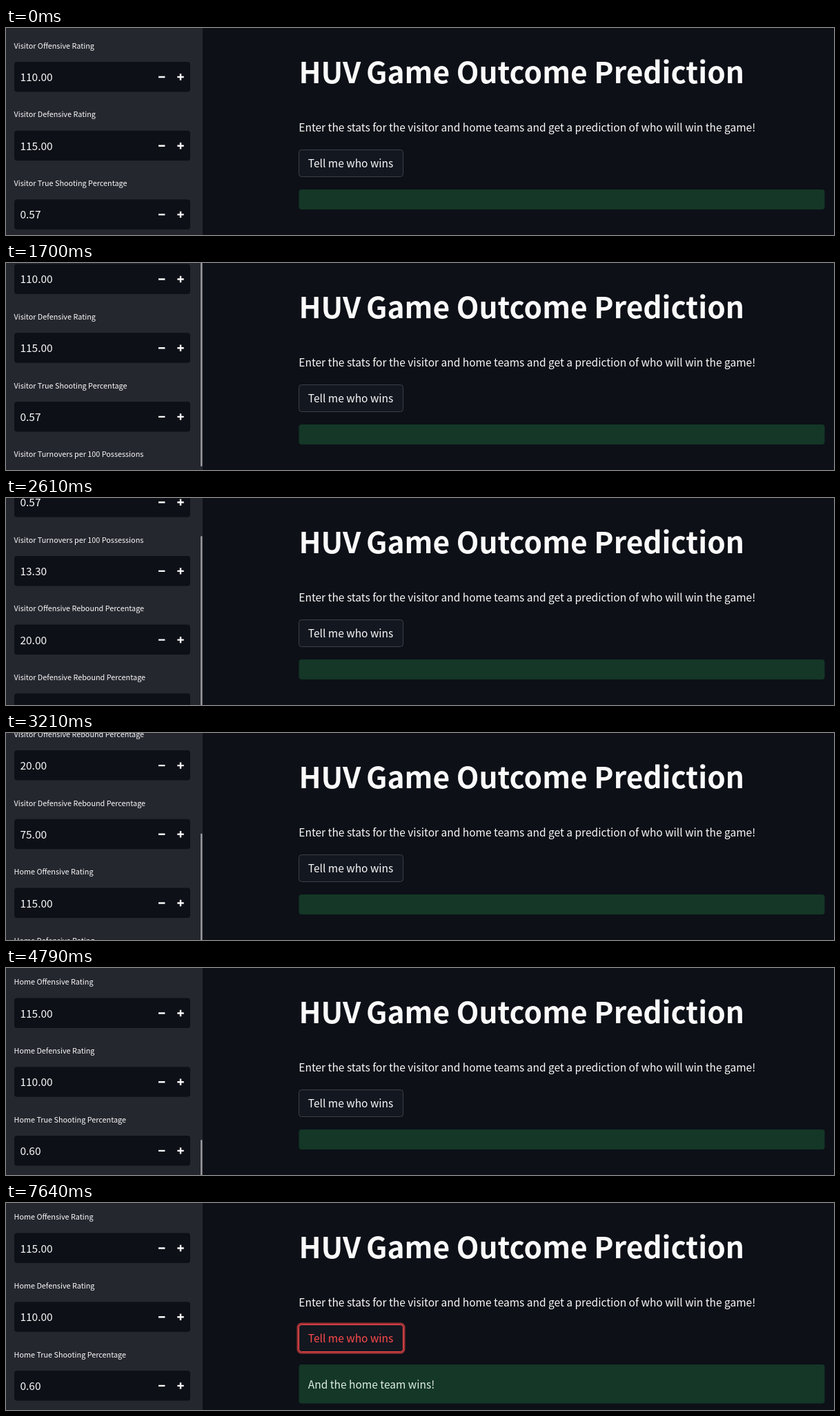
Write an HTML page that moves like this. It is 1200 px wide and 300 px high and loops after 7.94 s.

```html
<!DOCTYPE html>
<html lang="en">
<head>
<meta charset="utf-8">
<title>Game Outcome Prediction</title>
<style>
  html, body { margin: 0; width: 100%; height: 100%; overflow: hidden; background: #0d1017; }
  svg { display: block; width: 100%; height: 100%; }
  text {
    font-family: "Noto Sans CJK JP", "Noto Sans CJK SC", "Noto Sans CJK KR", "Noto Sans CJK", "Open Sans", sans-serif;
    font-size: 15.51px; fill: #fafafa;
  }
  .title { font-size: 42.45px; font-weight: 700; }
  .label { font-size: 10.83px; }
  .sign { stroke: #fafafa; stroke-width: 2.4; fill: none; }
</style>
</head>
<body>
<svg viewBox="0 0 1200 300" xmlns="http://www.w3.org/2000/svg">
  <rect width="1200" height="300" fill="#0d1017"/>
  <rect width="285" height="300" fill="#25272f"/>
  <g id="fields"></g>
  <rect id="thumb" x="282" width="2.5" height="363" fill="#97989c"/>

  <text class="title" x="424.4" y="80.2">HUV</text>
  <text class="title" x="522" y="80.2">Game Outcome Prediction</text>
  <text x="424.3" y="149.7">Enter the stats for the visitor and home teams and get a prediction of who will win the game!</text>

  <rect id="ring" x="423" y="175" width="154" height="42" rx="5" fill="none" stroke="#a03337" stroke-width="3"/>
  <rect id="button" x="424.5" y="176.5" width="151" height="39" rx="4" fill="#131720"/>
  <text id="caption" x="437.8" y="202.2">Tell me who wins</text>

  <rect id="banner" x="424.5" y="234" width="762" rx="4" fill="#143727"/>
  <text id="result" x="437.8" y="268.8" style="fill:#dff0e4">And the home team wins!</text>
</svg>
<script>
const LOOP = 7940, PITCH = 99.7, RED = "#ff4b4b";
const SHOW_BAR = 330, HIDE_BAR = 5790, HOVER = 6120, CLICK = 6610, ANSWER = 6760;

const stats = [
  ["Visitor Offensive Rating", "110.00"],
  ["Visitor Defensive Rating", "115.00"],
  ["Visitor True Shooting Percentage", "0.57"],
  ["Visitor Turnovers per 100 Possessions", "13.30"],
  ["Visitor Offensive Rebound Percentage", "20.00"],
  ["Visitor Defensive Rebound Percentage", "75.00"],
  ["Home Offensive Rating", "115.00"],
  ["Home Defensive Rating", "110.00"],
  ["Home True Shooting Percentage", "0.60"]
];

// Wheel notches: start, end, distance
const notches = [
  [1626, 1816, 141],
  [2470, 2650, 141],
  [2990, 3190, 140.7],
  [4214, 4430, 141],
  [4580, 4780, 40]
];

const $ = id => document.getElementById(id);
const show = (id, on) => $(id).setAttribute("visibility", on ? "visible" : "hidden");

$("fields").innerHTML = stats.map(([label, value], i) => `
  <g transform="translate(0 ${i * PITCH})">
    <text class="label" x="11.5" y="29.8">${label}</text>
    <rect x="12" y="49" width="255" height="43.5" rx="4" fill="#0d1017"/>
    <text x="20.4" y="77">${value}</text>
    <path class="sign" d="M221 71h9.4M248.3 71h9.4M253 66.3v9.4"/>
  </g>`).join("");

function ease(t, a, b) {
  const p = Math.min(1, Math.max(0, (t - a) / (b - a)));
  return p * p * (3 - 2 * p);
}

function draw(t) {
  const scroll = notches.reduce((sum, [a, b, d]) => sum + d * ease(t, a, b), 0);
  $("fields").setAttribute("transform", `translate(0 ${-scroll})`);
  $("thumb").setAttribute("y", 55 + 0.571 * (scroll - 263.6));
  show("thumb", t >= SHOW_BAR && t < HIDE_BAR);

  const hot = t >= HOVER;
  $("button").setAttribute("stroke", hot ? RED : "#3d4047");
  $("caption").style.fill = hot ? RED : "#fafafa";
  show("ring", t >= CLICK);

  const done = t >= ANSWER;
  $("banner").setAttribute("height", done ? 56.5 : 29);
  show("result", done);
}

let start;
function tick(now) {
  start ??= now;
  draw((now - start) % LOOP);
  requestAnimationFrame(tick);
}
draw(0);
requestAnimationFrame(tick);
</script>
</body>
</html>
```
